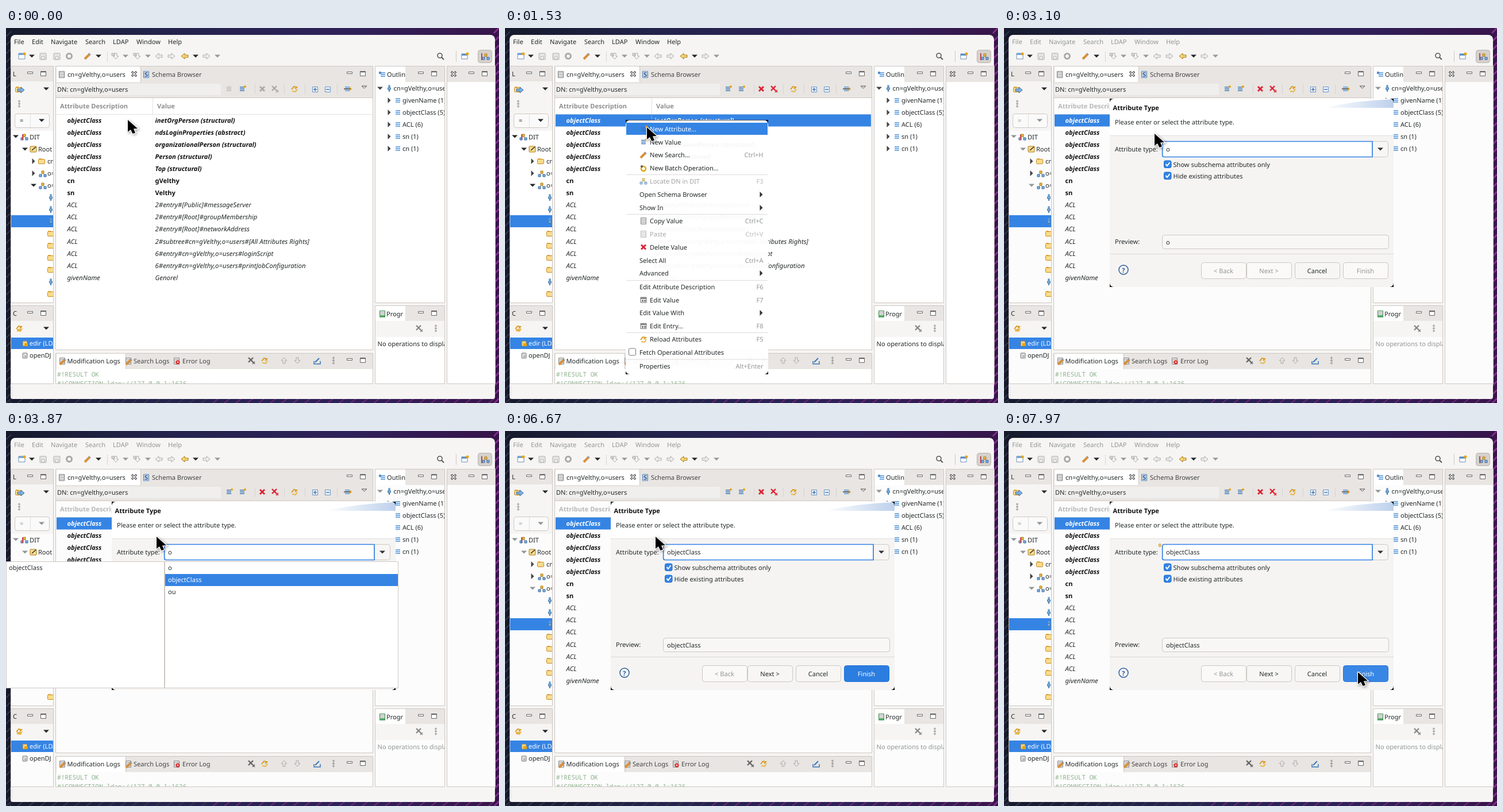
An HTML page with a canvas that plays this animation: 858 by 653 pixels, repeating every 8000 ms.

```html
<!DOCTYPE html>
<html lang="en">
<head>
<meta charset="utf-8">
<title>Directory editor</title>
<style>
html, body { margin: 0; width: 100%; height: 100%; overflow: hidden; }
canvas { display: block; }
</style>
</head>
<body>
<canvas id="stage" width="858" height="653"></canvas>
<script>
const ctx = document.getElementById('stage').getContext('2d');
const LOOP = 8000, USER = 'cn=gVelthy,o=users';
const INK = '#242829', GREY = '#929595', EDGE = '#cdc7c2', BG = '#f6f5f4', STRIP = '#e8e5e2', BLUE = '#3584e4', GOLD = '#e5a50a';
const SANS = '"Noto Sans", "Open Sans", sans-serif';
const SIZES = { '': 11.05, bold: 11.1, italic: 11.4, 'italic bold': 11.15 };
const clamp = v => Math.max(0, Math.min(1, v));

// Drawing helpers; text and icons are placed by their vertical centre.
function text(s, x, y, color = INK, style = '', align = 'left') {
  ctx.font = `${style} ${SIZES[style]}px ${SANS}`;
  ctx.textAlign = align;
  ctx.fillStyle = color;
  ctx.fillText(s, x, y + 4);
}
function box(x, y, w, h, fill, stroke, r = 0, lw = 1) {
  ctx.beginPath();
  ctx.roundRect(x, y, w, h, r);
  if (fill) { ctx.fillStyle = fill; ctx.fill(); }
  if (stroke) { ctx.lineWidth = lw; ctx.strokeStyle = stroke; ctx.stroke(); }
}
function path(points, color, lw = 0) {
  ctx.beginPath();
  points.forEach(([x, y]) => ctx.lineTo(x, y));
  if (lw) { ctx.lineWidth = lw; ctx.strokeStyle = color; ctx.stroke(); }
  else { ctx.fillStyle = color; ctx.fill(); }
}
function dot(x, y, r, color, lw = 0) {
  ctx.beginPath();
  ctx.arc(x, y, r, 0, 7);
  if (lw) { ctx.lineWidth = lw; ctx.strokeStyle = color; ctx.stroke(); }
  else { ctx.fillStyle = color; ctx.fill(); }
}
function clipped(x, y, w, h, draw) {
  ctx.save();
  ctx.beginPath();
  ctx.rect(x, y, w, h);
  ctx.clip();
  draw();
  ctx.restore();
}
function faded(alpha, draw) {
  ctx.save();
  ctx.globalAlpha = alpha;
  draw();
  ctx.restore();
}
function blackCorners(x, y, w, h, r) {
  ctx.beginPath();
  ctx.rect(x, y, w, h);
  ctx.roundRect(x, y, w, h, r);
  ctx.fillStyle = '#000';
  ctx.fill('evenodd');
}

// Icons
const down = (x, y, c = INK, s = 5) => path([[x - s, y - s / 2], [x + s, y - s / 2], [x, y + s / 2]], c);
const right = (x, y, c = '#444', s = 5) => path([[x - s / 2, y - s], [x - s / 2, y + s], [x + s / 2, y]], c);
const dots = (x, y) => [-4.5, 0, 4.5].forEach(d => dot(x, y + d, 1.3, '#777', 0.9));
const cross = (x, y, c, s = 4, lw = 2.8) => {
  path([[x - s, y - s], [x + s, y + s]], c, lw);
  path([[x + s, y - s], [x - s, y + s]], c, lw);
};
const twoCrosses = (x, y, c) => { cross(x - 1, y - 1, c, 4, 2.4); cross(x + 4, y + 4, c, 2, 1.6); };
const closeTab = (x, y) => { cross(x, y, '#444', 4, 3.4); cross(x, y, '#fff', 3.2, 1.4); };
const lines = (x, y, c = '#4a90d9') => [-3, 0, 3].forEach(d => path([[x - 4, y + d], [x + 4, y + d]], c, 1.5));
const addLines = (x, y, live) => {
  lines(x, y, live ? '#3976b8' : '#bbb');
  if (live) dot(x + 5, y - 4, 2, GOLD);
};
const person = (x, y) => { dot(x, y - 4, 2, '#6aa0d4'); box(x - 2.5, y - 2, 5, 5, '#78add9', '#3d75a8', 2); box(x - 1, y + 2, 2, 4, '#4f83b5'); };
const folder = (x, y) => { box(x - 5, y - 5, 5, 4, '#e9b44c'); box(x - 5.5, y - 3.5, 11, 8, '#f9dc8d', '#c68a1e', 1); };
const org = (x, y) => {
  path([[x - 4, y + 3], [x, y - 2], [x + 4, y + 3]], '#777', 1);
  box(x - 2, y - 5, 4, 4, '#f0c040', '#a87a10');
  for (const d of [-4, 4]) box(x + d - 2, y + 1, 4, 4, '#86b5e6', '#33669c');
};
const sheet = (x, y, c = '#888') => { box(x - 4.5, y - 5.5, 9, 11, '#fafafa', c); lines(x, y, '#aaa'); };
const sync = (x, y) => {
  path([[x - 5, y + 1], [x - 1, y - 4], [x + 4, y - 3], [x + 1, y]], '#d99a1c', 2);
  path([[x + 5, y], [x + 2, y + 5], [x - 4, y + 4]], '#e8b84a', 2);
};
const pencil = (x, y) => { path([[x - 5, y + 5], [x + 3, y - 3]], '#d9903a', 4); path([[x + 2, y - 5], [x + 5, y - 2]], '#8e97a8', 2); };
function arrow(x, y, dir, fill, edge) {
  const outline = [[-6, -2], [0, -2], [0, -5], [6, 0], [0, 5], [0, 2], [-6, 2], [-6, -2]].map(([a, b]) => [x + a * dir, y + b]);
  path(outline, fill);
  path(outline, edge, 1);
}
const vertical = (x, y, dir) => path([[-2, -5], [-2, 0], [-5, 0], [0, 5], [5, 0], [2, 0], [2, -5], [-2, -5]].map(([a, b]) => [x + a, y + b * dir]), '#aaa', 1);
const signBox = (x, y, plus) => {
  box(x - 4.5, y - 4.5, 9, 9, '#eaf2fc', '#6a94c4');
  path([[x - 3, y], [x + 3, y]], '#3465a4', 1.3);
  if (plus) path([[x, y - 3], [x, y + 3]], '#3465a4', 1.3);
};
const tableIcon = (x, y) => { box(x - 5, y - 4.5, 10, 9, '#fff', '#666'); box(x - 5, y - 4.5, 10, 3, '#888'); box(x - 3, y, 3, 3, '#777'); box(x + 1, y, 3, 3, '#777'); };
const viewButtons = (x, y) => { box(x - 4.5, y - 2.5, 9, 3, '#fff', '#666'); box(x + 18.5, y - 3.5, 9, 8, '#fff', '#666'); path([[x + 18, y - 2.5], [x + 28, y - 2.5]], '#666', 1.5); };

function panel(x, y, w, h, bodyTop, inactive) {
  box(x + 0.5, y + 0.5, w - 1, h - 1, STRIP, EDGE);
  box(x + 1, bodyTop, w - 2, y + h - bodyTop - 1, inactive ? '#fcfcfc' : '#fff');
}

function wallpaper() {
  const g = ctx.createLinearGradient(0, 0, 858, 0);
  g.addColorStop(0, '#161a2b');
  g.addColorStop(0.3, '#23234c');
  g.addColorStop(0.7, '#2f2159');
  g.addColorStop(1, '#38154a');
  ctx.fillStyle = g;
  ctx.fillRect(0, 0, 858, 653);
  for (let i = 0; i < 45; i++) {
    path([[0, i * 15], [9, i * 15 - 9]], '#3a4054', 1.5);
    path([[849, i * 15 + 9], [858, i * 15]], '#86308f', 2.5);
    path([[i * 20, 653], [i * 20 + 10, 645]], i < 18 ? '#34344a' : '#6b2a75', 2);
  }
}

function mainToolbar() {
  box(22, 44, 11, 10, '#fff', '#6d8db5'); box(22, 44, 11, 3, '#6f9fd8'); dot(32, 45, 2.5, GOLD);
  for (const x of [64, 88]) { box(x - 5, 44, 11, 11, '#e4e4e4', '#b0b0b0', 1); box(x - 2, 50, 5, 4, '#fff', '#b0b0b0'); }
  dot(110, 49, 4.5, '#a8a8a8', 3);
  pencil(142, 49);
  [45, 161].forEach(x => down(x, 49));
  [208, 247, 330, 368].forEach(x => down(x, 49, x === 330 ? INK : '#999'));
  for (let y = 42; y < 58; y += 3) box(176, y, 1, 1, '#999');
  [190, 228].forEach(x => { vertical(x + 1, 49, 1); box(x - 6, 44, 4, 4, '#ddd', '#aaa'); });
  arrow(266, 49, -1, '#eee', '#aaa');
  arrow(288, 49, 1, '#eee', '#aaa');
  arrow(311, 49, -1, '#f7d774', '#a8791a');
  arrow(349, 49, 1, '#eee', '#aaa');
  dot(755, 48, 4, '#555', 1.6); path([[758, 51], [762, 55]], '#555', 2);
  box(793, 45, 10, 9, '#fff', '#6d8db5'); box(793, 45, 10, 3, '#5b8fca'); dot(803, 45, 2.5, GOLD);
  path([[783.5, 40], [783.5, 59]], EDGE, 1);
  box(821.5, 38.5, 24, 22, '#d6d1cd', '#bbb4ae', 4);
  org(835, 50); path([[828, 44], [828, 56]], '#b34b5b', 2);
}

function leftPanels(inactive) {
  const dim = inactive ? GREY : INK;
  panel(8, 66, 75, 413, 179, inactive);
  box(9, 93, 73, 86, BG);
  text('L', 12, 80); viewButtons(42, 79);
  folder(22, 107); arrow(26, 108, 1, '#7fb2e8', '#3b6ea5'); down(70, 106); dots(23, 132);
  box(15.5, 149.5, 60, 24, '#fbfafa', EDGE, 4); path([[42.5, 150], [42.5, 173]], '#e2dfdc', 1);
  text('=', 24, 161, dim); down(62, 161, dim);
  clipped(9, 179, 73, 299, () => {
    box(9, 326, 73, 21, BLUE);
    down(17, 189, dim); org(32, 190); box(28, 185, 2, 10, '#c34a5b'); text('DIT', 41, 190);
    down(33, 211, dim); box(42, 206, 11, 10, '#f9dc8d', '#a8791a', 1); path([[45, 213], [52, 207]], INK, 1.5); text('Root', 56, 211);
    right(48, 232); folder(62, 232); text('cn=services', 72, 232);
    right(48, 253); org(64, 254); text('o=system', 72, 253);
    down(48, 274, dim); org(64, 275); text('o=users', 72, 274);
    [...'pppffffpf'].forEach((k, i) => (k === 'p' ? person : folder)(78, 295 + i * 21));
  });
  panel(8, 483, 75, 137, 538, inactive);
  box(9, 510, 73, 28, BG);
  text('C', 12, 497); viewButtons(42, 496);
  sync(23, 523); box(19, 524, 8, 4, '#e9b44c'); down(70, 523);
  clipped(9, 538, 73, 81, () => {
    box(9, 539, 73, 20, BLUE);
    [549, 570].forEach((y, i) => { box(29, y - 4, 8, 9, i ? '#ddd' : '#f3d27c', '#777', 1); box(32, y, 6, 5, i ? '#bbb' : GOLD); });
    text('edir (LDAP)', 41, 549, '#fff'); text('openDJ (LDAP)', 41, 570);
  });
}

const rows = [
  ...['inetOrgPerson (structural)', 'ndsLoginProperties (abstract)', 'organizationalPerson (structural)', 'Person (structural)', 'Top (structural)']
    .map(v => ['objectClass', v, 'italic bold']),
  ['cn', 'gVelthy', 'bold'], ['sn', 'Velthy', 'bold'],
  ...['2#entry#[Public]#messageServer', '2#entry#[Root]#groupMembership', '2#entry#[Root]#networkAddress', `2#subtree#${USER}#[All Attributes Rights]`,
    `6#entry#${USER}#loginScript`, `6#entry#${USER}#printJobConfiguration`].map(v => ['ACL', v, 'italic']),
  ['givenName', 'Genorel', 'italic']
];

function editor(selected, inactive) {
  panel(86, 66, 553, 495, 122, inactive);
  box(88, 67, 146, 27, '#fff'); path([[234.5, 67], [234.5, 94]], EDGE, 1);
  box(87, 97, 287, 20, '#f0efee');
  path([[87, 121.5], [638, 121.5]], EDGE, 1);
  sheet(97, 81, '#777'); text(USER, 107, 81);
  closeTab(223, 80);
  sheet(244, 81, '#4d80b8'); text('S', 241, 81, '#2a66a6', 'bold'); text('Schema Browser', 254, 81, '#444');
  viewButtons(598, 79);
  text('DN: ' + USER, 89, 107);
  addLines(388, 106, selected); addLines(411, 106, true);
  cross(446, 106, selected ? '#dd2233' : '#aaa'); twoCrosses(468, 106, selected ? '#dd2233' : '#aaa');
  sync(502, 106); signBox(538, 107, true); signBox(560, 107, false);
  lines(594, 106); path([[588, 106], [601, 106]], '#333', 1.3); path([[598, 103], [601, 106], [598, 109]], GOLD, 1.3);
  path([[619, 101], [628, 101], [623.5, 105], [619, 101]], '#555', 1);
  for (const x of [433.5, 484.5, 520.5, 576.5]) path([[x, 98], [x, 115]], '#d8d4d0', 1);
  const head = inactive ? '#b8b8b8' : '#8f8f8f';
  text('Attribute Description', 94, 136, head, 'bold'); text('Value', 263, 136, head, 'bold');
  path([[88, 150.5], [637, 150.5]], '#e4e1de', 1);
  path([[255.5, 122], [255.5, 150]], '#e4e1de', 1);
  path([[255.5, 151], [255.5, 445]], '#f5f5f5', 1);
  if (selected) { box(88, 150.5, 549, 21, BLUE); path([[255.5, 151], [255.5, 171]], '#6aa5ec', 1); }
  rows.forEach(([name, value, style], i) => {
    const y = 161 + i * 21.05, c = selected && !i ? '#fff' : i < 7 ? '#111' : INK;
    text(name, 106.5, y, c, style); text(value, 259.5, y, c, style);
  });
}

function logs(inactive) {
  panel(86, 566, 553, 54, 594, inactive);
  box(88, 567, 120, 27, '#fff'); path([[208.5, 567], [208.5, 594]], EDGE, 1);
  for (const x of [98, 213]) { sheet(x, 580); pencil(x + 1, 581); }
  sheet(297, 580); dot(299, 582, 3.5, '#d22'); cross(299, 582, '#fff', 1.5, 1);
  text('Modification Logs', 106.5, 580); text('Search Logs', 222, 580, '#444'); text('Error Log', 307, 580, '#444');
  twoCrosses(427, 579, '#666'); sync(450, 579);
  vertical(484, 579, -1); vertical(507, 579, 1);
  path([[536, 580], [536, 585], [547, 585], [547, 580]], '#3976b8', 1.5); path([[538, 582], [545, 575]], '#3976b8', 2);
  dots(570, 579); viewButtons(598, 578);
  clipped(88, 594, 549, 25, () => {
    ctx.font = '11.06px "Noto Sans Mono", monospace';
    ctx.textAlign = 'left';
    ctx.fillStyle = '#8fb28f';
    ctx.fillText('#!RESULT OK', 89, 607);
    ctx.fillText('#!CONNECTION ldap://127.0.0.1:1636', 89, 623);
  });
}

function rightPanels(inactive) {
  panel(642, 66, 122, 413, 94, inactive);
  box(643, 67, 52, 27, '#fff');
  box(649, 76, 4, 4, '#5b8fca'); lines(656, 81); text('Outlin', 663, 81); viewButtons(722, 79);
  clipped(643, 94, 120, 384, () => {
    down(651, 105, inactive ? GREY : '#444'); person(667, 105); text(USER, 674.5, 105);
    ['givenName (1)', 'objectClass (5)', 'ACL (6)', 'sn (1)', 'cn (1)'].forEach((s, i) => {
      const y = 126 + i * 21;
      right(667, y); lines(682, y); text(s, 690, y);
    });
  });
  panel(642, 483, 122, 137, 538, inactive);
  box(643, 484, 52, 26, '#fff'); box(643, 510, 120, 28, BG);
  sheet(655, 498, '#3a8a4a'); box(650, 500, 9, 4, '#58a868'); text('Progr', 662, 498); viewButtons(722, 496);
  twoCrosses(719, 523, '#888'); dots(748, 523);
  clipped(643, 538, 120, 81, () => text('No operations to display', 646.5, 550, inactive ? GREY : INK));
  panel(767, 66, 85, 554, 94, inactive);
  closeTab(779, 80); viewButtons(810, 79);
}

function workbench(selected, inactive) {
  wallpaper();
  box(8, 12, 843, 634, BG, null, [8, 8, 4, 4]);
  ['File', 'Edit', 'Navigate', 'Search', 'LDAP', 'Window', 'Help'].forEach((s, i) =>
    text(s, [14, 45, 78, 138, 186, 227, 282][i], 24, inactive ? GREY : INK));
  mainToolbar();
  leftPanels(inactive);
  editor(selected, inactive);
  logs(inactive);
  rightPanels(inactive);
  for (let y = 626; y < 640; y += 4) box(9.5, y, 1, 1, '#aaa');
}

// Label, centre, shortcut ('>' opens a submenu), icon, disabled
const menuItems = [
  ['New Attribute…', 176, '', (x, y) => addLines(x, y, true)],
  ['New Value', 198.5, '', (x, y) => addLines(x, y, true)],
  ['New Search…', 221, 'Ctrl+H', pencil],
  ['New Batch Operation…', 244, '', (x, y) => { dot(x, y + 1, 4, GOLD, 2.5); dot(x - 3, y - 3, 2, '#555'); }],
  ['Locate DN in DIT', 267, 'F3', org, true],
  ['Open Schema Browser', 290, '>'],
  ['Show In', 313, '>'],
  ['Copy Value', 336, 'Ctrl+C', sheet],
  ['Paste', 359, 'Ctrl+V', sheet, true],
  ['Delete Value', 381.5, '', (x, y) => cross(x, y, '#dd2233')],
  ['Select All', 404.5, 'Ctrl+A'],
  ['Advanced', 427, '>'],
  ['Edit Attribute Description', 451, 'F6'],
  ['Edit Value', 473.5, 'F7', tableIcon],
  ['Edit Value With', 496, '>'],
  ['Edit Entry…', 519, 'F8', tableIcon],
  ['Reload Attributes', 542, 'F5', sync],
  ['Fetch Operational Attributes', 565, ''],
  ['Properties', 588.5, 'Alt+Enter']
];

function contextMenu(highlight) {
  blackCorners(210, 160, 248, 443, 7);
  faded(ctx.globalAlpha * 0.96, () => box(210, 161, 248, 441, '#fff', null, 7));
  path([[214, 160.5], [454, 160.5]], '#555', 1);
  for (const y of [255.5, 324.5, 439.5, 530.5, 577]) path([[211, y], [457, y]], '#dedbd8', 1);
  if (highlight) box(211, 165, 246, 21, BLUE);
  menuItems.forEach(([label, y, key, icon, off], i) => {
    text(label, icon ? 252 : 234, y, highlight && !i ? '#fff' : off ? '#a5a5a5' : INK);
    if (icon) faded(ctx.globalAlpha * (off ? 0.55 : 1), () => icon(241, y));
    if (key === '>') right(446, y, '#333');
    else text(key, 449.5, y, off ? '#bbb' : '#929595', '', 'right');
  });
  box(215.5, 558, 12, 12, '#fff', '#777', 2);
}

function button(label, x, enabled, fill) {
  box(x + 0.5, 408.5, 78, 28, fill || (enabled ? '#f7f6f5' : '#faf9f8'), fill ? '#2274d6' : EDGE, 4);
  text(label, x + 39, 423, fill ? '#fff' : enabled ? INK : GREY, '', 'center');
}

function dialog(value, caret, hover) {
  clipped(184, 123, 494, 328, () => {
    box(184, 123, 494, 328, '#f5f4f3', null, 7);
    box(184, 123, 494, 64, '#fff', null, [7, 7, 0, 0]);
    path([[184, 187.5], [678, 187.5]], '#e2dfdc', 1);
    const g = ctx.createLinearGradient(555, 0, 678, 0);
    g.addColorStop(0, '#ffffff');
    g.addColorStop(1, '#bdd0ec');
    ctx.beginPath();
    ctx.moveTo(555, 139);
    ctx.quadraticCurveTo(615, 126, 678, 124);
    ctx.lineTo(678, 139);
    ctx.fillStyle = g;
    ctx.fill();
  });
  text('Attribute Type', 189.5, 139, '#111', 'bold');
  text('Please enter or select the attribute type.', 193, 164);
  text('Attribute type:', 193, 211);
  box(269.5, 196.5, 3.5, 5, '#f8d98a', '#d08a1a', 1.5);
  box(641.5, 197.5, 27, 27, '#f7f6f5', EDGE, [0, 4, 4, 0]); down(655, 211, '#333');
  box(275.7, 197.5, 365.3, 27, '#fff', BLUE, [3, 0, 0, 3], 1.7);
  text(value, 282, 211);
  if (caret) path([[340.5, 203], [340.5, 218]], '#222', 1);
  [['Show subschema attributes only', 238], ['Hide existing attributes', 258]].forEach(([s, y]) => {
    box(278.5, y - 7, 12.5, 12.5, BLUE, '#1b6acb', 2.5);
    path([[281.5, y - 1], [284, y + 2], [288.5, y - 4]], '#fff', 2);
    text(s, 294.5, y);
  });
  text('Preview:', 193, 372);
  box(275.5, 360.5, 394, 24, '#f8f7f6', EDGE, 4);
  text(value, 282, 372.5);
  path([[184, 393.5], [678, 393.5]], '#dcd9d6', 1);
  dot(208, 421, 8, '#2a5d9c', 1.5); text('?', 208, 421.5, '#2a5d9c', 'bold', 'center');
  const ready = value.length > 1;
  button('< Back', 343, false);
  button('Next >', 422, ready);
  button('Cancel', 506, true);
  button('Finish', 590, ready, ready && (hover ? '#3987e5' : '#2b7de0'));
}

function proposals() {
  box(276.5, 227.5, 406, 220, '#fff', EDGE);
  box(277, 249, 405, 21, BLUE);
  ['o', 'objectClass', 'ou'].forEach((s, i) => text(s, 282, 238 + i * 21, i === 1 ? '#fff' : INK));
}
function proposalInfo() {
  box(0.5, 227.5, 275, 220, '#fff', EDGE);
  text('objectClass', 5, 238);
}

const mix = (a, b, u) => a + (b - a) * u;
function pointerAt(t) {
  if (t < 1900) { const u = clamp((t - 1070) / 460); return [mix(212, 247, u), mix(160, 173, u)]; }
  if (t < 7340) { const u = clamp((t - 1870) / 160); return [mix(247, 262, u), mix(173, 184, u)]; }
  const s = clamp((t - 7340) / 630), u = s * s * (3 - 2 * s), v = 1 - u;
  const bezier = (a, b, c, d) => v ** 3 * a + 3 * v * v * u * b + 3 * v * u * u * c + u ** 3 * d;
  return [bezier(262, 310, 540, 616), bezier(184, 118, 340, 420)];
}
function pointer([x, y]) {
  const shape = [[0, 0], [0, 21], [5, 17], [8.5, 24], [13, 22.5], [10, 15.5], [17, 15], [0, 0]].map(([a, b]) => [x + a, y + b]);
  ctx.save();
  ctx.shadowColor = 'rgba(0,0,0,.4)';
  ctx.shadowBlur = 4;
  ctx.shadowOffsetX = ctx.shadowOffsetY = 1.5;
  path(shape, '#fff', 2.4);
  ctx.restore();
  path(shape, '#000');
}

function render(t) {
  const tip = pointerAt(t);
  workbench(t >= 800, t >= 2400);
  const menu = t < 1900 ? clamp((t - 760) / 170) : 1 - clamp((t - 1870) / 160);
  if (t >= 800 && menu > 0) faded(menu, () => contextMenu(tip[1] > 165));
  if (t >= 2230) {
    const value = t < 3070 ? '' : t < 4100 ? 'o' : 'objectClass';
    const caret = t >= 4100 && (t < 4230 || (t >= 4670 && (t - 4670) % 1200 < 800));
    const shown = clamp((t - 2400) / 200);
    if (shown) faded(shown, () => dialog(value, caret, tip[0] > 590 && tip[1] > 408));
    blackCorners(184, 123, 494, 328, 7);
    if (t >= 3170 && t < 4100) faded(clamp((t - 3140) / 200), proposals);
    if (t >= 3870 && t < 4100) proposalInfo();
  }
  pointer(tip);
}

ctx.textRendering = 'geometricPrecision';
const start = performance.now();
function tick() {
  render((performance.now() - start) % LOOP);
  requestAnimationFrame(tick);
}
tick();
</script>
</body>
</html>
```
